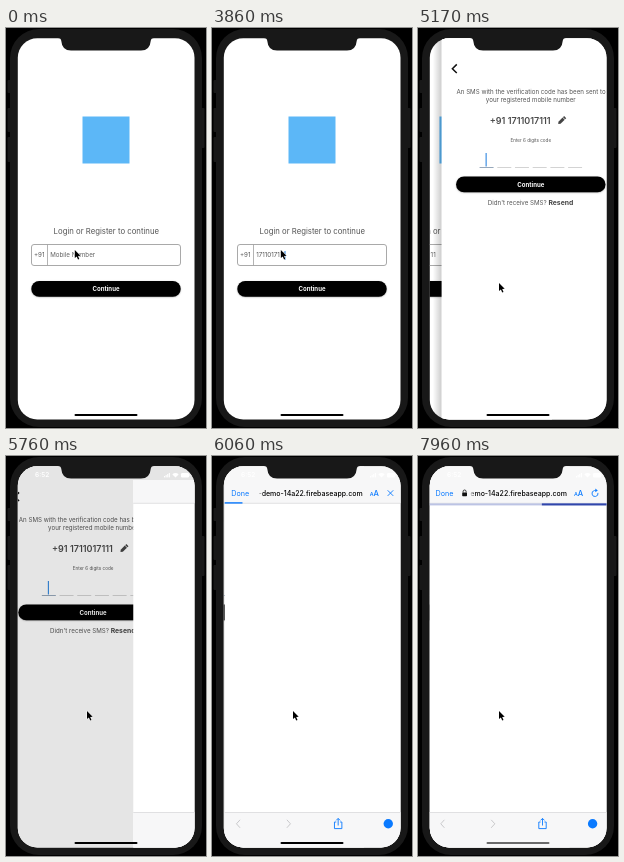
Write an HTML page with a canvas that moves like this. It is 200 px wide and 400 px high and loops after 7.99 s.

```html
<!DOCTYPE html>
<html lang="en">
<head>
<meta charset="utf-8">
<title>Phone login</title>
<style>
html, body { margin: 0; width: 100%; height: 100%; overflow: hidden; background: #000; }
canvas { display: block; width: 200px; height: 400px; }
</style>
</head>
<body>
<canvas id="stage"></canvas>
<script>
const LOOP = 7990;
const LEFT = 11, TOP = 10, WIDTH = 178, HEIGHT = 382;
const BLUE = '#0a7aff', CASE = '#181818';
const PHONE = '1711017111';
const KEY_TIMES = [1230, 1400, 1600, 1830, 2100, 2270, 2760, 2990, 3290, 3560];

const canvas = document.getElementById('stage');
const ctx = canvas.getContext('2d');
const dpr = window.devicePixelRatio || 1;
canvas.width = 200 * dpr;
canvas.height = 400 * dpr;

const clamp = v => Math.max(0, Math.min(1, v));
const ramp = (t, a, b) => clamp((t - a) / (b - a));
const smooth = u => u * u * (3 - 2 * u);
const mix = (a, b, u) => a + (b - a) * u;

function rect(x, y, w, h, color) {
  ctx.fillStyle = color;
  ctx.fillRect(x, y, w, h);
}

function roundPath(x, y, w, h, r) {
  ctx.beginPath();
  ctx.roundRect(x, y, w, h, r);
}

function pill(x, y, w, h, r, color) {
  roundPath(x, y, w, h, r);
  ctx.fillStyle = color;
  ctx.fill();
}

function line(points, color, width) {
  ctx.beginPath();
  points.forEach(([x, y], i) => i ? ctx.lineTo(x, y) : ctx.moveTo(x, y));
  ctx.strokeStyle = color;
  ctx.lineWidth = width;
  ctx.stroke();
}

function text(str, x, y, size, color, weight = 400, align = 'left') {
  ctx.font = `${weight} ${size}px Inter, Roboto, sans-serif`;
  ctx.textAlign = align;
  ctx.fillStyle = color;
  ctx.fillText(str, x, y);
  return ctx.measureText(str).width;
}

function shifted(dx, draw) {
  ctx.save();
  ctx.translate(dx, 0);
  draw();
  ctx.restore();
}

function button(y) {
  ctx.save();
  ctx.shadowColor = 'rgba(0,0,0,.35)';
  ctx.shadowBlur = 1.5 * dpr;
  ctx.shadowOffsetY = 0.5 * dpr;
  pill(25.3, y, 149.4, 15.8, 7.9, '#000');
  ctx.restore();
  text('Continue', 100, y + 10.2, 6.1, '#fff', 700, 'center');
}

function caretAlpha(t) {
  if (t < 1130) return ramp(t, 270, 500) * (1 - ramp(t, 800, 970));
  if (t < KEY_TIMES[0]) return ramp(t, 1100, 1230);
  if (t > 4930) return 0;
  return 1 - ramp(t, 4060, 4200) + ramp(t, 4360, 4510);
}

function loginPage(t) {
  rect(LEFT, TOP, WIDTH, HEIGHT, '#fff');
  rect(76.5, 88.5, 47, 47, '#5cb7f7');
  text('Login or Register to continue', 100.3, 205.5, 7.75, '#555', 400, 'center');

  roundPath(25.5, 216.5, 149, 21, 2.5);
  ctx.strokeStyle = '#a0a0a0';
  ctx.lineWidth = 0.9;
  ctx.stroke();
  line([[41.5, 216.5], [41.5, 237.5]], '#a0a0a0', 0.8);
  text('+91', 28, 229.3, 6.2, '#555');

  const count = KEY_TIMES.filter(k => k <= t).length;
  const typed = count
    ? text(PHONE.slice(0, count), 44.2, 229.3, 6.2, '#555')
    : (text('Mobile Number', 44.2, 229.3, 6.2, '#606060'), 0);
  ctx.globalAlpha = caretAlpha(t);
  rect(44 + typed, 223, 1, 9, '#2f86e0');
  ctx.globalAlpha = 1;
  button(253);
}

function pencil(x, y) {
  ctx.save();
  ctx.translate(x, y);
  ctx.rotate(-Math.PI / 4);
  ctx.fillStyle = '#444';
  ctx.beginPath();
  ctx.moveTo(-5, 0);
  ctx.lineTo(-3.2, -1.5);
  ctx.lineTo(2.6, -1.5);
  ctx.lineTo(2.6, 1.5);
  ctx.lineTo(-3.2, 1.5);
  ctx.fill();
  ctx.fillRect(3.2, -1.5, 1.6, 3);
  ctx.restore();
}

function codePage() {
  rect(LEFT, TOP, WIDTH, HEIGHT, '#fff');
  line([[26, 36.4], [21.6, 40.7], [26, 45]], '#111', 1.5);
  text('An SMS with the verification code has been sent to', 100.3, 65.7, 6.2, '#555', 400, 'center');
  text('your registered mobile number', 100, 74.2, 6.2, '#555', 400, 'center');
  text('+91 ' + PHONE, 59, 95.8, 9, '#4a4a4a', 600);
  pencil(131, 92.5);
  text('Enter 6 digits code', 100, 114.3, 4.6, '#555', 400, 'center');
  for (let i = 0; i < 6; i++) {
    rect(48.8 + i * 17.7, 139, 14, 0.8, i ? '#c9c9c9' : '#7d93ab');
  }
  rect(54.8, 125, 1.1, 13.5, '#2f86e0');
  button(148.5);
  const w = text("Didn't receive SMS? ", 57, 177.4, 6.2, '#555');
  text('Resend', 57 + w, 177.4, 6.8, '#444', 700);
}

function address(secure) {
  const from = secure ? 51.5 : 44;
  const fade = ctx.createLinearGradient(from, 0, from + 6, 0);
  fade.addColorStop(0, 'rgba(0,0,0,0)');
  fade.addColorStop(1, '#000');
  ctx.save();
  ctx.beginPath();
  ctx.rect(from, 28, 110, 18);
  ctx.clip();
  text('-demo-14a22.firebaseapp.com', 149, 39.6, 7, fade, 500, 'right');
  ctx.restore();
  if (!secure) return;
  pill(44.2, 36.4, 4.8, 3.8, 0.7, '#111');
  ctx.beginPath();
  ctx.arc(46.6, 35.5, 1.5, Math.PI, 0);
  ctx.lineTo(48.1, 36.6);
  ctx.moveTo(45.1, 35.5);
  ctx.lineTo(45.1, 36.6);
  ctx.strokeStyle = '#111';
  ctx.lineWidth = 0.8;
  ctx.stroke();
}

function reloadIcon() {
  ctx.beginPath();
  ctx.arc(177, 37.5, 3, -0.2, Math.PI * 1.6);
  ctx.strokeStyle = BLUE;
  ctx.lineWidth = 0.9;
  ctx.stroke();
  ctx.beginPath();
  ctx.moveTo(177.3, 32.6);
  ctx.lineTo(179.8, 34.6);
  ctx.lineTo(177.3, 36.2);
  ctx.fillStyle = BLUE;
  ctx.fill();
}

function toolbar() {
  line([[26.4, 363.8], [22.8, 367.8], [26.4, 371.8]], '#c3c3c6', 0.9);
  line([[73.2, 363.8], [76.8, 367.8], [73.2, 371.8]], '#c3c3c6', 0.9);
  line([[122.6, 366], [120.8, 366], [120.8, 372.6], [128.2, 372.6], [128.2, 366], [126.4, 366]], BLUE, 0.9);
  line([[124.5, 369.5], [124.5, 362.6]], BLUE, 0.9);
  line([[122.5, 364.4], [124.5, 362.4], [126.5, 364.4]], BLUE, 0.9);
  ctx.beginPath();
  ctx.arc(174.6, 367.8, 4.7, 0, Math.PI * 2);
  ctx.fillStyle = BLUE;
  ctx.fill();
}

// Indeterminate bar on a two-second cycle: grow, then leave to the right.
function pageLoader(t) {
  const u = (t - 6705) / 2000;
  if (u < 0) return;
  const left = u < 0.5 ? 0.5 * u : mix(0.25, 1, (u - 0.5) / 0.25);
  const right = Math.min(1, 2 * u);
  rect(LEFT, 47.4, WIDTH, 2, '#bcc3e4');
  rect(LEFT + WIDTH * left, 47.4, WIDTH * (right - left), 2, '#3146ab');
}

function browser(t) {
  rect(LEFT, 24, WIDTH, HEIGHT, '#fff');
  rect(LEFT, 24, WIDTH, 23, '#f7f7f8');
  rect(LEFT, 356, WIDTH, 40, '#f7f7f8');
  rect(LEFT, 46.9, WIDTH, 0.5, '#c4c4c6');
  rect(LEFT, 356, WIDTH, 0.5, '#c8c8ca');
  pageLoader(t);

  ctx.globalAlpha = ramp(t, 5770, 5920);
  text('Done', 17.6, 39.6, 7.2, BLUE);
  address(t >= 6800);
  text('A', 156, 39.6, 5.4, BLUE, 500);
  text('A', 159.8, 39.6, 7.6, BLUE, 500);
  if (t < 7050) {
    line([[174, 34.3], [179.6, 39.9]], BLUE, 0.9);
    line([[179.6, 34.3], [174, 39.9]], BLUE, 0.9);
  } else {
    reloadIcon();
  }
  toolbar();

  const loaded = mix(0.1 * ramp(t, 5780, 6050), 1, smooth(ramp(t, 6640, 7050)));
  ctx.globalAlpha = 1 - ramp(t, 7080, 7400);
  rect(LEFT, 46.2, WIDTH * loaded, 1.4, BLUE);
  ctx.globalAlpha = 1;
}

function statusBar() {
  text('6:52', 29, 21.4, 6.5, '#fff', 600);
  for (let i = 0; i < 4; i++) rect(158 + i * 1.6, 20 - i, 1.1, 1.4 + i, '#fff');
  ctx.beginPath();
  ctx.moveTo(169.5, 21.5);
  ctx.arc(169.5, 21.5, 4.4, -Math.PI * 0.75, -Math.PI * 0.25);
  ctx.fillStyle = '#fff';
  ctx.fill();
  pill(175, 17, 8, 4.4, 1.2, '#fff');
  rect(183.5, 18.4, 0.7, 1.6, '#fff');
}

function body() {
  rect(0, 0, 200, 400, '#000');
  [[52, 13], [80, 24], [109, 25]].forEach(([y, h]) => pill(1.5, y, 4, h, 1, CASE));
  pill(194.5, 80, 4, 40, 1, CASE);
  pill(4, 1, 192, 398, 29, CASE);
}

function notch() {
  ctx.beginPath();
  ctx.moveTo(52, 9);
  ctx.lineTo(52, 10);
  ctx.quadraticCurveTo(55, 10, 55.3, 13);
  ctx.quadraticCurveTo(56, 22.5, 65, 22.5);
  ctx.lineTo(135, 22.5);
  ctx.quadraticCurveTo(144, 22.5, 144.7, 13);
  ctx.quadraticCurveTo(145, 10, 148, 10);
  ctx.lineTo(148, 9);
  ctx.fillStyle = CASE;
  ctx.fill();
}

function pointer(t) {
  const u = smooth(ramp(t, 3840, 4510));
  ctx.save();
  ctx.translate(mix(68.8, 81, u), mix(222, 255, u));
  ctx.beginPath();
  [[0, 0], [0, 8], [1.9, 6.4], [3.2, 9.5], [4.5, 9], [3.2, 5.9], [5.7, 5.7]]
    .forEach(([x, y], i) => i ? ctx.lineTo(x, y) : ctx.moveTo(x, y));
  ctx.closePath();
  ctx.strokeStyle = '#fff';
  ctx.lineWidth = 1;
  ctx.stroke();
  ctx.fillStyle = '#000';
  ctx.fill();
  ctx.restore();
}

function screen(t) {
  const push = 1 - Math.pow(1 - ramp(t, 4930, 5300), 2.5);
  const x = (t - 5694) * 0.0183;
  const rest = t < 5760 ? 1 : t > 6290 ? 0 : (1 + x) * Math.exp(-x);

  if (push < 1) shifted(-WIDTH / 3 * push, () => loginPage(t));
  if (push > 0) {
    const dx = WIDTH * (1 - push) - 0.21 * WIDTH * (1 - rest);
    if (push < 1) {
      const edge = LEFT + dx;
      const shade = ctx.createLinearGradient(edge - 9, 0, edge, 0);
      shade.addColorStop(0, 'rgba(0,0,0,0)');
      shade.addColorStop(1, 'rgba(0,0,0,.2)');
      rect(edge - 9, TOP, 9, HEIGHT, shade);
    }
    rect(Math.max(LEFT, LEFT + dx), TOP, WIDTH, HEIGHT, '#fff');
    shifted(dx, codePage);
  }
  if (t >= 5760) {
    rect(LEFT, TOP, WIDTH, HEIGHT, 'rgba(0,0,0,.1)');
    const g = Math.round(mix(247, 229, clamp(rest / 0.655)));
    rect(LEFT, TOP, WIDTH, 14, `rgb(${g},${g},${g})`);
    shifted(WIDTH * rest, () => browser(t));
  }
  statusBar();
  const tone = Math.round(mix(0, 105, ramp(t, 6900, 7400)));
  pill(68.5, 386.1, 63, 2, 1, `rgb(${tone},${tone},${tone})`);
}

function draw(t) {
  ctx.setTransform(dpr, 0, 0, dpr, 0, 0);
  body();
  ctx.save();
  roundPath(11.8, 10.2, 176.7, 381.3, 19.5);
  ctx.clip();
  screen(t);
  ctx.restore();
  notch();
  pointer(t);
}

const start = performance.now();
function tick(now) {
  draw(Math.max(0, now - start) % LOOP);
  requestAnimationFrame(tick);
}
draw(0);
requestAnimationFrame(tick);
</script>
</body>
</html>
```
